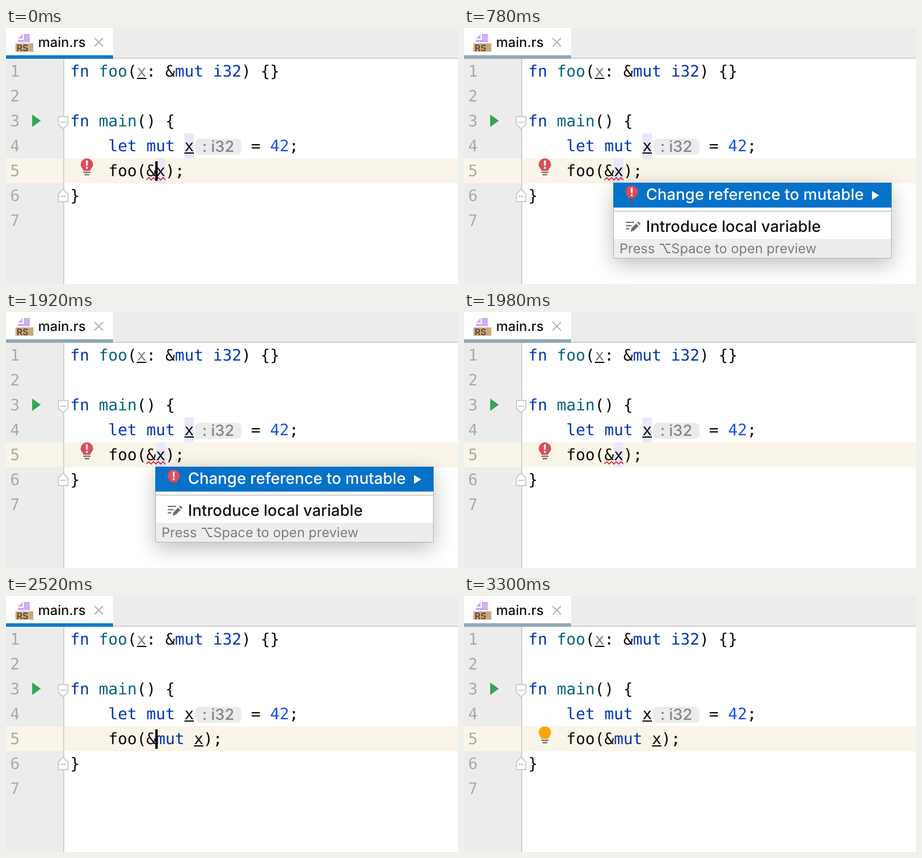
These frames come from a looping animation (760 by 432 pixels, 3360 ms). An HTML page:

```html
<!DOCTYPE html>
<html lang="en">
<head>
<meta charset="utf-8">
<title>Editor quick fix</title>
<style>
  html, body { margin: 0; width: 100%; height: 100%; overflow: hidden; background: #fff; }
  svg { display: block; width: 760px; height: 432px; }
  text { white-space: pre; text-rendering: geometricPrecision; }
  .code { font: 26.58px "DejaVu Sans Mono", monospace; fill: #080808; }
  .ui { font-family: Inter, sans-serif; font-weight: 500; }
  .num { fill: #a9a9a9; }
  .kw { fill: #0033b3; }
  .fn { fill: #00627a; }
  .lit { fill: #1750eb; }
  .arg { fill: #808080; }
  .use { fill: #e9e7fb; }
  .fold { fill: #fff; stroke: #cdcdcd; stroke-width: 2; }
  #popup { filter: drop-shadow(0 10px 17px rgba(0, 0, 0, .25)); }
</style>
</head>
<body>
<svg viewBox="0 0 760 432">
  <defs>
    <g id="bulb">
      <path d="M136 220a10.5 10.5 0 0 1 10.5 10.5c0 5-4 6-5 10.5h-11c-1-4.500-5-5.500-5-10.500a10.500 10.500 0 0 1 10.500-10.500z"/>
      <path d="M130 243.500h12M132 247.500h8" stroke="#5f5f5f" stroke-width="2"/>
    </g>
    <g id="alert">
      <use href="#bulb" fill="#db4d5a"/>
      <path d="M136 223.500v9M136 234.500v3" stroke="#fff" stroke-width="3"/>
    </g>
  </defs>

  <!-- Tab bar -->
  <path d="M180 0h580v51H180z" fill="#ececec"/>
  <path d="M180 50h580v2H180z" fill="#d1d1d1"/>
  <path id="tabLine" d="M0 46h180v6H0z"/>
  <path d="M30 10h10v14H20v-4h10z" fill="#cdaef8"/>
  <path d="M20 18l8-8v8z" fill="#cdaef8"/>
  <path d="M16 26h30v14H16z" fill="#cba980"/>
  <text class="ui" x="18" y="38.500" font-size="15" style="font-weight:600" fill="#57432d">RS</text>
  <text class="ui" x="54" y="32" font-size="22.600" fill="#111">main.rs</text>
  <path d="M149 17l14 14M163 17l-14 14" stroke="#b5b5b5" stroke-width="2"/>

  <!-- Gutter and line backgrounds -->
  <path d="M0 52h96v380H0z" fill="#ececec"/>
  <path d="M0 220h760v42H0z" fill="#f9f5e8"/>
  <path d="M96 52h2v380h-2z" fill="#d1d1d1"/>
  <g id="numbers" class="code"></g>
  <path d="M44 146l14.500 10.500L44 167z" fill="#35a556"/>
  <path class="fold" d="M88 149.500h16v13l-8 7.500-8-7.500zM91 159h10"/>
  <path class="fold" d="M88 293h16v-13l-8-8-8 8zM91 284h10"/>

  <!-- Code -->
  <g id="uses"><path class="use" d="M300 178h16v42h-16zM252 220h16v42h-16z"/></g>
  <rect x="318" y="187" width="78" height="27" rx="8" fill="#ebebeb"/>
  <text class="ui" x="330" y="208.500" font-size="26" fill="#858585">: i32</text>
  <g class="code">
    <text x="108" y="82"><tspan class="kw">fn</tspan> <tspan class="fn">foo</tspan>(<tspan class="arg">x</tspan>: &amp;<tspan class="kw">mut i32</tspan>) {}</text>
    <text x="108" y="166"><tspan class="kw">fn</tspan> <tspan class="fn">main</tspan>() {</text>
    <text x="172" y="208"><tspan class="kw">let mut</tspan> x</text>
    <text x="412" y="208">= <tspan class="lit">42</tspan>;</text>
    <text x="108" y="292">}</text>
    <path d="M220 84h16v2h-16zM300 210h16v2h-16z"/>
    <g id="broken">
      <text x="172" y="250">foo(&amp;x);</text>
      <path d="M236 256.500l4-4 4 4 4-4 4 4 4-4 4 4 4-4 4 4" fill="none" stroke="#e0262b" stroke-width="1.700"/>
    </g>
    <g id="fixed">
      <text x="172" y="250">foo(&amp;<tspan class="kw">mut</tspan> x);</text>
      <path d="M316 252h16v2h-16z"/>
    </g>
  </g>
  <use id="error" href="#alert"/>
  <use id="hint" href="#bulb" fill="#f9a40c"/>
  <path id="caret" d="M251 225h4v33h-4z"/>

  <!-- Quick-fix menu -->
  <g id="popup" class="ui">
    <path d="M251.500 261.500h467v127h-467z" fill="#fff" stroke="#b4b4b4"/>
    <path d="M251 261h468v42H251z" fill="#0572c9"/>
    <path d="M252 308h466v2H252z" fill="#d1d1d1"/>
    <path d="M252 356h466v32H252z" fill="#ededed"/>
    <use href="#alert" x="146" y="46"/>
    <text x="306" y="290" font-size="26.300" fill="#fff">Change reference to mutable</text>
    <path d="M686 275l12 7.500-12 7.500z" fill="#fff"/>
    <path d="M272 328h14M272 333.500h10M272 339h6" stroke="#6e6e6e" stroke-width="2.200"/>
    <path d="M280 344l1.500-6 8-8 4 4-8 8zM291 328.500l2-2 4 4-2 2z" fill="#6e6e6e"/>
    <text x="306" y="344" font-size="26.300" fill="#111">Introduce local variable</text>
    <g fill="#7b7b7b" font-size="22.500" font-weight="400">
      <text x="261.500" y="380">Press</text>
      <path d="M329 365h6l7 14h5M339 365h8" fill="none" stroke="#7b7b7b" stroke-width="2"/>
      <text x="348.500" y="380">Space to open preview</text>
    </g>
  </g>
</svg>
<script>
  const LOOP = 3360, OPEN = 780, CLOSE = 1980, FIX = 2040, HINT = 2760, BLUR = 3300;
  const $ = id => document.getElementById(id);

  for (let n = 1; n <= 7; n++) {
    $('numbers').innerHTML += `<text class="num" x="7" y="${40 + 42 * n}">${n}</text>`;
  }

  function draw(t) {
    const fixed = t >= FIX;
    const focused = t < OPEN || fixed && t < BLUR;
    const visible = {
      uses: !fixed,
      broken: !fixed,
      error: !fixed,
      fixed,
      hint: t >= HINT,
      caret: t < OPEN || fixed && t < BLUR - 60,
      popup: t >= OPEN && t < CLOSE
    };
    for (const id in visible) $(id).style.display = visible[id] ? '' : 'none';
    $('tabLine').setAttribute('fill', focused ? '#137bca' : '#92a8b8');
  }

  const start = performance.now();
  function tick() {
    draw((performance.now() - start) % LOOP);
    requestAnimationFrame(tick);
  }
  tick();
</script>
</body>
</html>
```
